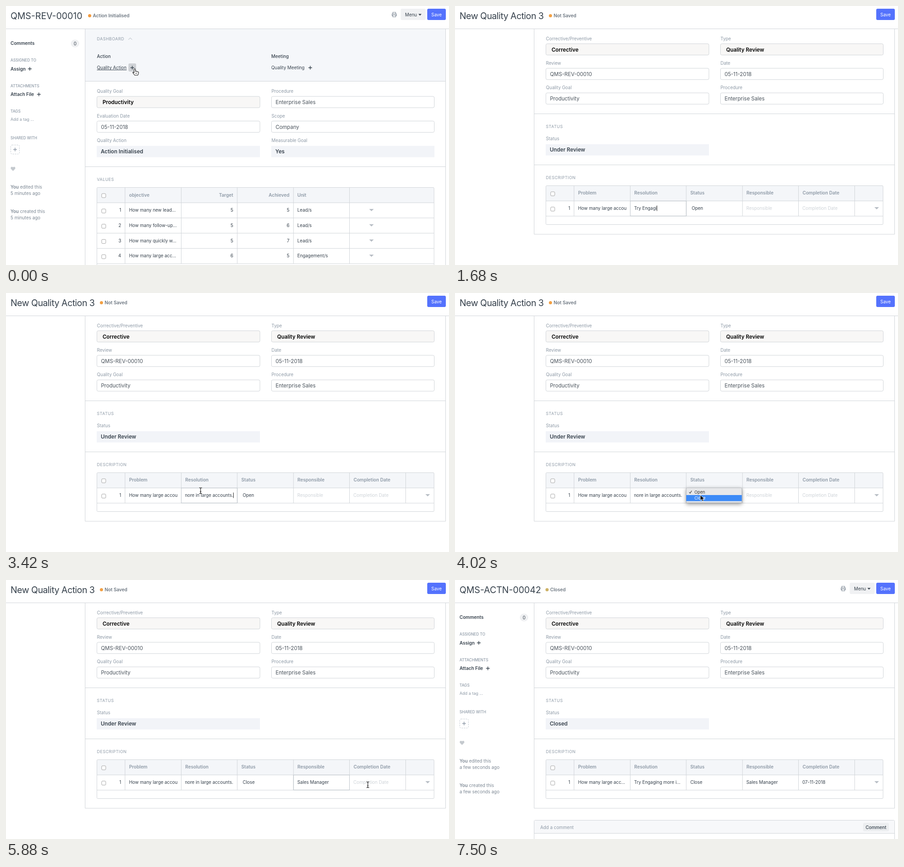
An HTML page for the animation above (7.62 s loop, 977x573 px).

```html
<!DOCTYPE html>
<html lang="en">
<head>
<meta charset="utf-8">
<style>
html, body { margin: 0; width: 100%; height: 100%; overflow: hidden; background: #fff; }
svg { display: block; font-family: Inter, sans-serif; white-space: pre; }
</style>
</head>
<body>
<svg id="stage" width="977" height="573" viewBox="0 0 977 573"></svg>
<script>
const LOOP = 7620, OPENED = 240, FOCUSED = 840, TYPING = 1020, KEY = 64;
const MENU_OPEN = 3720, MENU_CLOSE = 4140, ROLE_FOCUS = 4620, ROLE_TYPING = 4800;
const DATE_FOCUS = 5940, DATE_SET = 6360, SAVED = 6960, LEAVE = 7380;
const LINE = '#d1d5d9', GREY = '#8d99a6', INK = '#36414c', TINT = '#f2f4f8';
const RESOLUTION = 'Try Engaging more in large accounts.';
const stage = document.getElementById('stage');
const pen = document.createElement('canvas').getContext('2d');

// Text is placed by the middle of its capitals.
const text = (x, y, s, o = {}) => {
  const { size = 9.9, weight = 400, color = INK, anchor = 'start', space = 0 } = o;
  return `<text x="${x}" y="${y + size * .364}" font-size="${size}" font-weight="${weight}" fill="${color}" text-anchor="${anchor}" letter-spacing="${space}">${s}</text>`;
};
const bold = (x, y, s, o) => text(x, y, s, { size: 10.1, weight: 600, ...o });
const caps = (x, y, s) => text(x, y, s, { size: 9, color: GREY, space: .5 });
const rect = (x, y, w, h, fill, stroke = 'none', r = 0) =>
  `<rect x="${x}" y="${y}" width="${w}" height="${h}" rx="${r}" fill="${fill}" stroke="${stroke}"/>`;
const path = (d, stroke = LINE, fill = 'none', width = 1) =>
  `<path d="${d}" stroke="${stroke}" fill="${fill}" stroke-width="${width}"/>`;
const at = (x, y, s) => `<g transform="translate(${x} ${y})">${s}</g>`;
const clip = (x, y, w, h, s) =>
  `<svg x="${x}" y="${y}" width="${w}" height="${h}" viewBox="${x} ${y} ${w} ${h}">${s}</svg>`;
const plus = (x, y, color = INK) => path(`M${x - 4} ${y}h8M${x} ${y - 4}v8`, color, 'none', 1.4);
const rule = y => path(`M174.5 ${y}H969.5`);
const checkbox = y => rect(211, y - 4.5, 9, 9, '#fff', '#a5a5a5', 2);
const caret = (x, y) => path(`M${x - 5} ${y - 2.5}h10l-5 5z`, 'none', '#b8bec5');

function field(x, y, label, value, kind) {
  const strong = kind === 'bold', fixed = kind === 'fixed', right = x > 500;
  const box = fixed ? rect(x - .5, y + 12, 360, 25, TINT)
    : rect(x, y + 11.5, right ? 359 : 359.5, 25, strong ? '#f8f7f6' : '#fff', kind === 'focus' ? '#b3bac2' : LINE, 3);
  const glow = kind === 'focus' ? rect(x - 1, y + 10.5, 361.5, 27, 'none', '#e6e9ed', 4) : '';
  return text(x, y, label, { color: GREY }) + glow + box +
    text(x + (strong ? 12.5 : fixed ? 8.5 : 9), y + 24.5, value,
      strong || fixed ? { size: 11.7, weight: 600, color: strong ? '#000' : INK } : { size: 11.5, color: '#4a535c' });
}

function header(title, state, dot, width, hot) {
  const tight = title.startsWith('New') ? -.5 : 0;
  return text(10, 22, title, { size: 19.7, space: tight }) +
    `<circle cx="${width}" cy="21.5" r="3.5" fill="${dot}"/>` +
    bold(width + 7, 21.5, state, { color: '#6c7680' }) +
    rect(929, 6, 41, 25, hot ? '#2f58f6' : '#5472fd', hot ? '#2448cf' : 'none', 3) +
    text(949.5, 19, 'Save', { color: '#fff', anchor: 'middle' }) + path('M0 50.5H977');
}

function sidebar(age) {
  const notes = ['edited', 'created'].map((verb, i) => {
    const y = 400 + 54 * i;
    return text(10, y, `<tspan font-weight="600">You</tspan> ${verb} this`, { color: '#7d8894' }) +
      text(10, y + 14, age, { color: '#7d8894' });
  }).join('');
  const heads = [[120, 'ASSIGNED TO'], [177, 'ATTACHMENTS'], [233, 'TAGS'], [292, 'SHARED WITH']]
    .map(([y, s]) => text(10, y, s, { size: 8.4, weight: 500, color: GREY })).join('');
  return heads + notes + bold(10, 82.5, 'Comments') + rect(143, 74.5, 18.5, 17, '#eff0f2', 'none', 8.5) +
    text(152.3, 83, '0', { anchor: 'middle' }) +
    bold(10, 139, 'Assign') + plus(52.5, 139) + bold(10, 195.5, 'Attach File') + plus(72.5, 195.5) +
    text(10, 251, 'Add a tag ...', { size: 9.1, color: GREY }) +
    `<rect x="10.5" y="307.5" width="19" height="20" rx="3" fill="none" stroke="#c3cad1" stroke-dasharray="3 2"/>` +
    plus(20, 317.5, '#8d99a6') +
    path('M15.5 365l-4.4-4.4c-2.4-3 1.8-6.8 4.4-3.4c2.6-3.4 6.8.4 4.4 3.4z', 'none', '#c4c9ce') +
    rect(870.5, 6, 55, 25, '#f0f1f3', 'none', 3) + text(880, 19, 'Menu') + path('M909.5 17.5h7l-3.5 3.8z', 'none', INK) +
    path('M853 17.5v-3.5h6.5v3.5M853 21.5h-1.5v-4h9.5v4h-1.5M853 20h6.5v4h-6.5z', '#7d8894', 'none', 1.1);
}

function grid(top, bottom, columns, rows) {
  let s = rect(200.5, top, 743.5, 34, '#f4f6f9');
  for (let i = 0; i <= rows; i++) {
    const y = top + 33.7 * (i + 1);
    if (y < 573) s += path(`M200.5 ${y}H944`);
  }
  const end = top + 33.7 * (rows + 1);
  for (const x of columns) s += path(`M${x} ${top}V${end}`);
  return s + rect(200.5, top, 743.5, bottom - top, 'none', LINE, 2) + checkbox(top + 18);
}

function reviewPage(t) {
  const hover = t < 60;
  const goals = [['new lead...', 5, 5, 'Lead/s'], ['follow-up...', 5, 6, 'Lead/s'],
    ['quickly w...', 5, 7, 'Lead/s'], ['large acc...', 6, 5, 'Engagement/s']];
  let s = rect(175, 51, 794, 115, '#f5f7fa') + path('M174.5 50V573M969.5 50V573') + rule(166.5) + rule(355.5) +
    header('QMS-REV-00010', 'Action Initialised', '#f29a3d', 184.5) + sidebar('5 minutes ago') +
    caps(200.5, 72.5, 'DASHBOARD') + path('M270 74.5l4-4 4 4', '#a9b2bb') +
    text(200.5, 111, 'Action', { weight: 500 }) + text(585, 111, 'Meeting', { weight: 500 }) +
    text(200.5, 136, 'Quality Action') + text(585, 136, 'Quality Meeting') + plus(671, 136.5) +
    (hover ? path('M200.5 141.5H266', INK) + rect(270, 127, 17, 18, '#cfd2d6', 'none', 3) : '') + plus(278.5, 136.5) +
    field(200.5, 188.5, 'Quality Goal', 'Productivity', 'bold') + field(585.5, 188.5, 'Procedure', 'Enterprise Sales') +
    field(200.5, 243, 'Evaluation Date', '05-11-2018') + field(585.5, 243, 'Scope', 'Company') +
    field(200.5, 297.5, 'Quality Action', 'Action Initialised', 'fixed') + field(585.5, 297.5, 'Measurable Goal', 'Yes', 'fixed') +
    caps(200.5, 383.5, 'VALUES') + grid(401.5, 590, [262.5, 386.5, 510, 634, 757.5], 4);
  const head = { color: GREY };
  s += bold(271.5, 418, 'objective', head) + bold(501, 418, 'Target', { ...head, anchor: 'end' }) +
    bold(625, 418, 'Achieved', { ...head, anchor: 'end' }) + bold(642.5, 418, 'Unit', head);
  goals.forEach(([goal, target, achieved, unit], i) => {
    const y = 451.5 + 33.7 * i, end = { anchor: 'end' };
    s += checkbox(y + 2) + text(254, y, i + 1, end) + text(271.5, y, 'How many ' + goal) +
      text(501, y, target, end) + text(625, y, achieved, end) + text(642.5, y, unit) + caret(806, y);
  });
  return s;
}

function typed(t) {
  const s = RESOLUTION.slice(0, Math.max(0, Math.floor((t - TYPING) / KEY)));
  const active = t >= FOCUSED && t < MENU_OPEN;
  pen.font = '9.9px Inter, sans-serif';
  const width = pen.measureText(s).width, x = Math.min(395, 501 - width);
  return clip(395, 432, 107.5, 32, s ? text(x, 447.5, s) : text(395, 447.5, 'Resolution', { color: '#cfd4d9' })) +
    (active ? rect(386.5, 431.5, 123.5, 33, 'none', '#bcc3ca') + path(`M${x + width + .5} 441.5v12`, '#222') : '');
}

function actionPage(t) {
  const saved = t >= SAVED, hot = t >= 6660 && t < LEAVE;
  const role = 'Sales Manager'.slice(0, Math.max(0, Math.floor((t - ROLE_TYPING) / KEY)));
  const faint = { color: '#cfd4d9' };
  let s = path('M174.5 50V505M969.5 50V505') + rule(238.5) + rule(351.5) + rule(505) +
    (saved ? header('QMS-ACTN-00042', 'Closed', '#cdb266', 203, hot) + sidebar('a few seconds ago')
      : header('New Quality Action 3', 'Not Saved', '#f2a044', 210.5, hot)) +
    field(200.5, 72, 'Corrective/Preventive', 'Corrective', 'bold') + field(585.5, 72, 'Type', 'Quality Review', 'bold') +
    field(200.5, 126.3, 'Review', 'QMS-REV-00010', t < FOCUSED ? 'focus' : '') + field(585.5, 126.3, 'Date', '05-11-2018') +
    field(200.5, 180.7, 'Quality Goal', 'Productivity') + field(585.5, 180.7, 'Procedure', 'Enterprise Sales') +
    (t < FOCUSED ? path('M545 148h4v-3l5 4.5-5 4.5v-3h-4z', 'none', '#222') : '') +
    caps(200.5, 266.5, 'STATUS') + field(200.5, 293.7, 'Status', saved ? 'Closed' : 'Under Review', 'fixed') +
    caps(200.5, 379.5, 'DESCRIPTION') + grid(397.5, 483.5, [262.5, 386.5, 510, 634, 757.5, 881.5], 1);
  ['Problem', 'Resolution', 'Status', 'Responsible', 'Completion Date'].forEach((name, i) =>
    s += bold(271.5 + 123.75 * i, 413.5, name, { color: GREY }));
  s += checkbox(449.3) + text(254, 447.5, 1, { anchor: 'end' }) + caret(930, 447.5) +
    (saved ? text(271.5, 447.5, 'How many large acc...') + text(395, 447.5, 'Try Engaging more i...')
      : clip(271, 432, 107, 32, text(271.5, 447.5, 'How many large accounts')) + typed(t)) +
    text(saved ? 519 : 522, 447.5, t < MENU_CLOSE ? 'Open' : 'Close') +
    text(642.5, 447.5, role || 'Responsible', role ? {} : faint) +
    text(766, 447.5, t < DATE_SET ? 'Completion Date' : '07-11-2018', t < DATE_SET ? faint : {});
  if (t >= ROLE_FOCUS && t < DATE_FOCUS) s += rect(634, 431.5, 123.5, 33, 'none', '#bcc3ca');
  if (t >= DATE_FOCUS && t < 6480) s += rect(757.5, 431.5, 124, 33, 'none', '#bcc3ca');
  if (t >= MENU_OPEN && t < MENU_CLOSE) s += statusMenu(t >= 3900);
  if (saved) s += rect(174.5, 531.5, 795, 60, '#fff', LINE, 2) + rect(175, 532, 794, 28.5, '#f7f8fa') + rule(560.5) +
    text(188, 547, 'Add a comment', { color: GREY }) + rect(900, 537.5, 57, 18.5, '#eceef0', 'none', 3) +
    text(928.5, 547, 'Comment', { weight: 500, anchor: 'middle' });
  return s;
}

function statusMenu(second) {
  const item = { size: 9.2, color: '#333' }, lit = { size: 9.2, color: '#fff' };
  return `<g style="filter:drop-shadow(0 3px 4px #0006)">${rect(510, 431, 122.5, 33, '#e7e8ea', '#b9bcc0', 2)}</g>` +
    rect(510, second ? 447 : 433.5, 122.5, 13.5, '#3c8af7') +
    path('M516.5 440.5l2 2.5 3.5-5.5', second ? '#333' : '#fff', 'none', 1.2) +
    text(528, 440.5, 'Open', second ? item : lit) + text(528, 454, 'Close', second ? lit : item);
}

// Pointer stops: time, x, y, shape until the next stop.
const stops = [
  [0, 284, 139, 'hand'], [60, 284, 139, 'arrow'], [300, 310, 200, 'arrow'], [480, 400, 390, 'beam'], [600, 426, 437, 'beam'],
  [TYPING, 426, 437, ''], [3400, 426, 437, 'beam'], [3600, 541, 447, 'arrow'], [MENU_CLOSE, 541, 447, 'arrow'],
  [4440, 680, 447, 'beam'], [ROLE_TYPING, 690, 448, ''], [5640, 690, 448, 'beam'], [5880, 798, 453, 'beam'],
  [6360, 798, 453, 'arrow'], [6660, 953, 22, 'hand'], [LEAVE, 953, 22, '']
];
const shapes = {
  hand: path('M-1.5 1q1.5-2 3 0v4.5q2-1 2.6.5q1.8-.8 2.4.7q2-.4 2 1.6l-.6 3-1.4 3H0l-4.5-6q.5-2 3 .2z', '#222', '#fff', 1.1) +
    path('M2 8.5v3M4.2 8.5v3', '#222', 'none', .8),
  arrow: path('M0 0v12l3-2.6 2 4.6 2.2-1-2-4.4h4z', '#fff', '#000', .9),
  beam: path('M-3-6.5Q0-6.5 0-5Q0-6.5 3-6.5M0-5V5M-3 6.5Q0 6.5 0 5Q0 6.5 3 6.5M-1.5 2h3', '#222', 'none', 1.2)
};
function pointer(t) {
  let i = stops.length - 1;
  while (stops[i][0] > t) i--;
  const [start, x, y, shape] = stops[i], [end, nx, ny] = stops[i + 1] || [LOOP, x, y];
  if (!shape) return '';
  const p = (t - start) / (end - start), k = p * p * (3 - 2 * p);
  return at(x + (nx - x) * k, y + (ny - y) * k, shapes[shape]);
}

let shown = -1;
function draw(now) {
  const t = Math.floor(now % LOOP / 60) * 60;
  if (t !== shown) stage.innerHTML = (t < OPENED ? reviewPage(t) : actionPage(t)) + pointer(t);
  shown = t;
  requestAnimationFrame(draw);
}
draw(performance.now());
</script>
</body>
</html>
```
